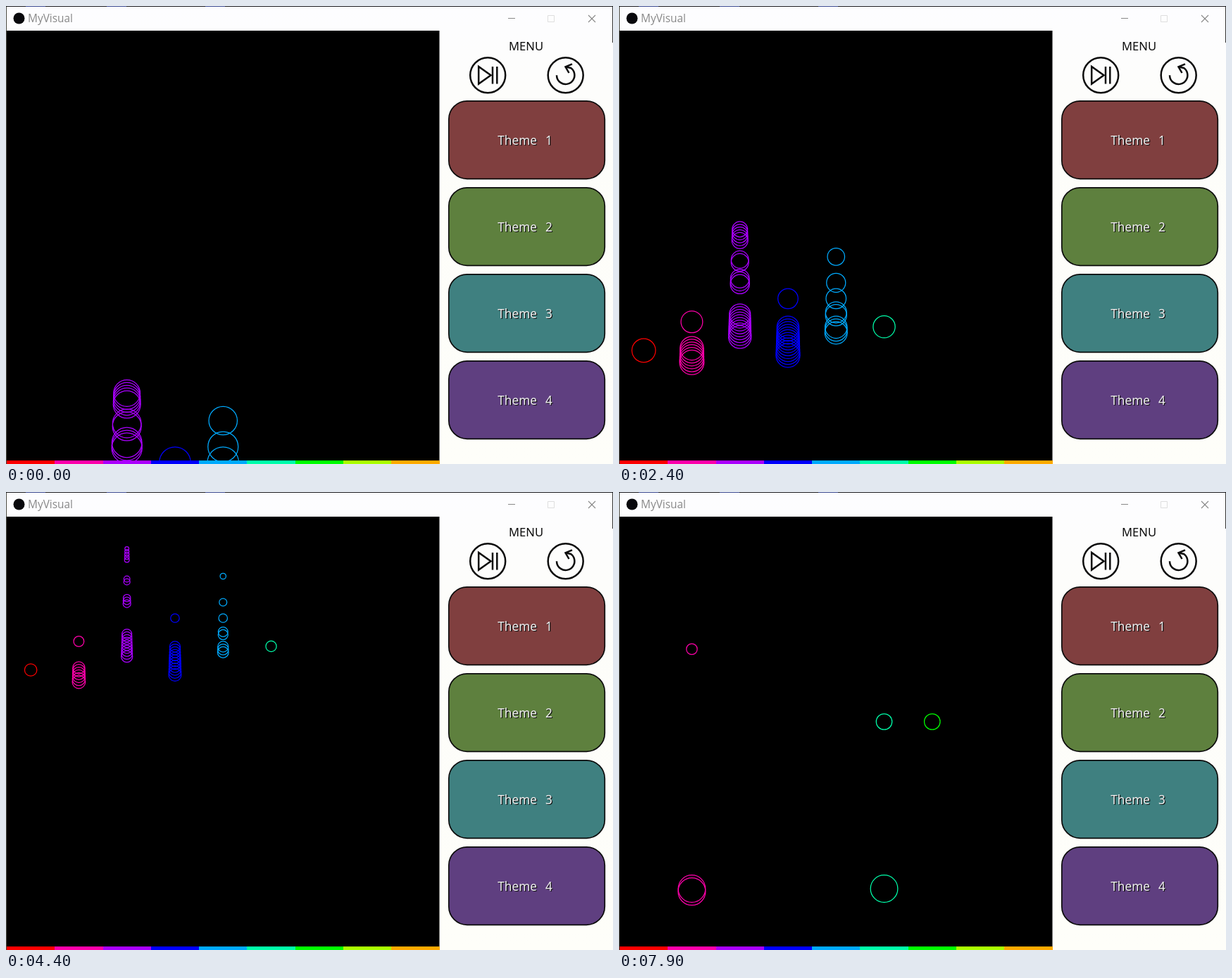
These frames come from a looping animation (862 px wide and 650 px high, 8000 ms). An HTML page with a canvas:

```html
<!DOCTYPE html>
<html lang="en">
<head>
<meta charset="utf-8">
<title>MyVisual</title>
<style>
html, body { margin: 0; width: 100%; height: 100%; overflow: hidden; background: #fdfdfb; }
canvas { display: block; }
</style>
</head>
<body>
<canvas id="stage" width="862" height="650"></canvas>
<script>
const ctx = document.getElementById('stage').getContext('2d');
const LOOP = 8000, STEP = 100;
const VIEW = { x: 1, y: 35, w: 614.5, h: 615 };
const LANES = 9, LANE = VIEW.w / LANES;
const GAP = 4;
const INK = '#0c0c0c', GRAY = '#888';

// Distance risen by all rings, as [ms, px]
const RISE = [[0, 0], [800, 70], [1800, 166], [3600, 366], [4400, 469], [5900, 653.5], [7900, 912]];

// Each burst is [lane, height of its first ring at time zero, ring count]
const BURSTS = [
  [0, 721, 1],
  [1, 680.5, 1], [1, 718, 6], [1, 1134.5, 1], [1, 1474.5, 2],
  [2, 549, 5], [2, 592, 2], [2, 619, 3], [2, 670, 9],
  [3, 647.5, 1], [3, 688, 11],
  [4, 588, 1], [4, 625, 1], [4, 647.5, 1], [4, 667, 2], [4, 688, 3],
  [5, 687.5, 1], [5, 1237.5, 1], [5, 1474.5, 1],
  [6, 1237.5, 1]
];

const hue = lane => `hsl(${360 - lane * 40}, 100%, 50%)`;

function rise(t) {
  const i = RISE.findIndex(([ms]) => ms >= t) || 1;
  const [t0, s0] = RISE[i - 1], [t1, s1] = RISE[i];
  return s0 + (s1 - s0) * (t - t0) / (t1 - t0);
}

function box(x, y, w, h, color) {
  ctx.fillStyle = color;
  ctx.fillRect(x, y, w, h);
}

function text(str, x, y, size, color, family = '"Noto Sans"') {
  ctx.font = `${size}px ${family}, sans-serif`;
  ctx.fillStyle = color;
  ctx.fillText(str, x, y);
}

function stroke(width, color) {
  ctx.lineWidth = width;
  ctx.strokeStyle = color;
  ctx.stroke();
}

function line(points, width, color, close) {
  ctx.beginPath();
  points.forEach(([x, y]) => ctx.lineTo(x, y));
  if (close) ctx.closePath();
  stroke(width, color);
}

function ring(x, y, r, width, color, from = 0, to = Math.PI * 2) {
  ctx.beginPath();
  ctx.arc(x, y, r, from, to);
  stroke(width, color);
}

function titleBar() {
  box(0, 0, 862, 1, '#1c1c20');
  for (const x of [28, 143, 283]) box(x, 0, 28, 1, '#3c4a90');
  box(0, 1, 1, 649, '#4a4a42');
  box(861, 1, 1, 51, '#333');
  ctx.beginPath();
  ctx.arc(18.5, 17.5, 8, 0, Math.PI * 2);
  ctx.fillStyle = '#08080c';
  ctx.fill();
  text('MyVisual', 31, 23, 15.4, GRAY, '"Open Sans"');
  box(713, 17, 10, 1, GRAY);
  ctx.beginPath();
  ctx.rect(769.5, 13.5, 9, 9);
  stroke(1, '#dedede');
  line([[827, 13], [837, 23]], 1.1, GRAY);
  line([[837, 13], [827, 23]], 1.1, GRAY);
}

function icons() {
  const w = 2.5;
  for (const x of [684.2, 794.7]) ring(x, 98.2, 25, w, INK);
  line([[671.2, 86], [671.2, 110.5], [688.5, 98.2]], w, INK, true);
  for (const x of [691, 697.3]) line([[x, 86], [x, 110.5]], w, INK);
  ring(794.7, 98.2, 12.7, w, INK, -1, Math.PI);
  line([[804, 82.3], [794.5, 86.3], [799.5, 95]], w, INK);
  line([[794.5, 86.3], [802, 88]], w, INK);
}

function button(n) {
  const y = 12 + n * 123;
  ctx.beginPath();
  ctx.roundRect(628.8, y - 0.2, 221.5, 110.5, 26);
  ctx.fillStyle = ['#803f3f', '#5e803e', '#3f8080', '#5f3f80'][n - 1];
  ctx.fill();
  stroke(1.7, INK);
  for (const [d, color] of [[1.3, '#151515'], [0, '#eee']]) {
    text('Theme', 698.3 + d, y + 62 + d, 17.2, color);
    text(n, 766 + d, y + 62 + d, 17.2, color);
  }
}

function rings(up) {
  ctx.save();
  ctx.beginPath();
  ctx.rect(VIEW.x, VIEW.y, VIEW.w, VIEW.h);
  ctx.clip();
  for (const [lane, start, count] of BURSTS) {
    for (let i = 0; i < count; i++) {
      const y = start + i * GAP - up;
      if (y > 650 || y < 20) continue;
      ring(VIEW.x + LANE * (lane + 0.5), y + 0.5, 0.1 + 0.0342 * y, 1.25, hue(lane));
    }
  }
  ctx.restore();
}

function draw(t) {
  const bg = ctx.createLinearGradient(0, 0, 0, 650);
  bg.addColorStop(0, '#fdfdff');
  bg.addColorStop(0.25, '#fdfdfa');
  bg.addColorStop(1, '#fefef9');
  box(0, 0, 862, 650, bg);
  titleBar();
  text('MENU', 714, 63, 16.6, INK);
  icons();
  for (let n = 1; n <= 4; n++) button(n);
  box(VIEW.x, VIEW.y, VIEW.w, VIEW.h, '#000');
  rings(rise(t));
  for (let i = 0; i < LANES; i++) {
    const x = Math.round(VIEW.x + i * LANE);
    box(x, 645, Math.round(VIEW.x + (i + 1) * LANE) - x, 5, hue(i));
  }
}

let begin;
function tick(now) {
  begin ??= now;
  const t = (now - begin) % LOOP;
  draw(Math.floor(t / STEP) * STEP);
  requestAnimationFrame(tick);
}
draw(0);
requestAnimationFrame(tick);
</script>
</body>
</html>
```
